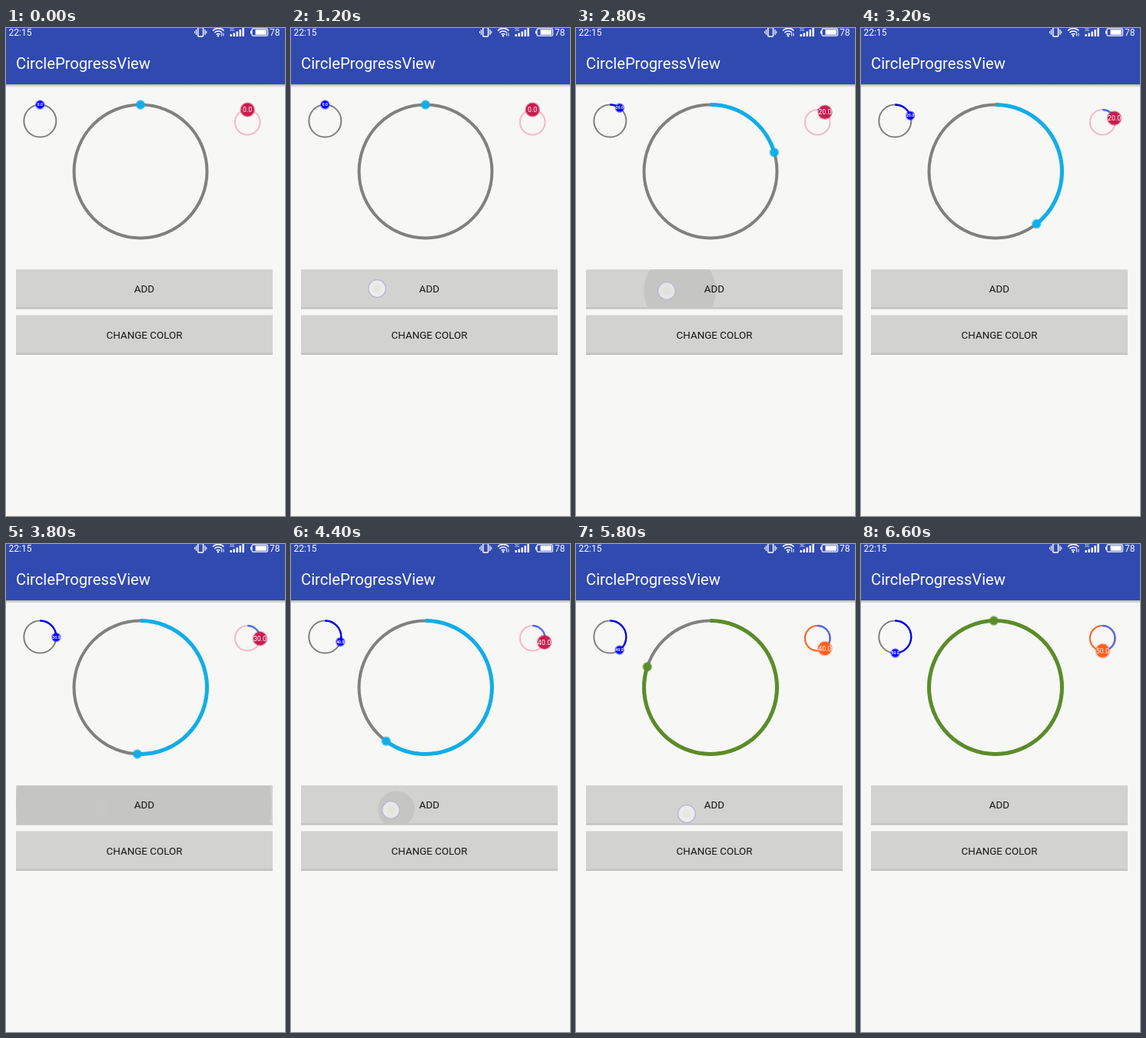
An HTML page that plays this animation: 363 px wide and 633 px high, repeating every 6.7 s.

```html
<!DOCTYPE html>
<html lang="en">
<head>
<meta charset="utf-8">
<title>CircleProgressView</title>
<style>
html, body { margin: 0; width: 100%; height: 100%; overflow: hidden; background: #f7f7f5; }
svg { display: block; font-family: Roboto, sans-serif; }
.mid { text-anchor: middle; }
.line { fill: none; stroke: #fff; }
</style>
</head>
<body>
<svg width="363" height="633" viewBox="0 0 363 633">
  <defs>
    <linearGradient id="shade" x2="0" y2="1">
      <stop offset="0" stop-color="#000" stop-opacity=".28"/>
      <stop offset="1" stop-color="#000" stop-opacity="0"/>
    </linearGradient>
  </defs>
  <rect width="363" height="633" fill="#f7f7f5"/>
  <rect y="73" width="363" height="4" fill="url(#shade)"/>
  <rect width="363" height="73" fill="#304aaf"/>

  <g fill="#fff">
    <text x="3.5" y="9.5" font-size="12">22:15</text>
    <text x="343" y="9.5" font-size="12">78</text>
    <text x="13" y="53" font-size="20.2">CircleProgressView</text>
    <g class="line" stroke-width="1.5">
      <rect x="249.8" y="-.5" width="6.8" height="11.5" rx="1"/>
      <path d="M247.5 2v7M259 2v7" stroke-width="1.2"/>
      <path d="M245.6 4v3M260.8 4v3" stroke-width="1"/>
      <path d="M269 3.5a10 10 0 0 1 14.5 0M271.3 6a7 7 0 0 1 9.8 0M273.6 8.4a4 4 0 0 1 5 0"/>
      <path d="M280.6 6.5v4M283 6.5v4" stroke-width="1"/>
      <rect x="320" y=".8" width="20.5" height="9.4" rx="1.5" stroke-width="1.2"/>
    </g>
    <circle cx="276" cy="10.2" r="1.2"/>
    <text x="291" y="4" font-size="5">3G</text>
    <path d="M291.5 8h2.4v3h-2.4zM295.5 6.5h2.4v4.500h-2.400zM299.500 4.500h2.400v6.500h-2.400zM303.500 2h2.400v9h-2.400zM307.400 0h2.400v11h-2.400z"/>
    <path d="M318 3.500h1.500v4h-1.500zM324.500 2.300h14.500v6.400h-14.500z"/>
  </g>

  <g id="rings"></g>
  <g id="buttons"></g>
  <g id="finger">
    <circle r="11.3" fill="#ececec" stroke="#b4b4d6" stroke-width="1.3"/>
    <circle r="5.5" fill="#e6e8de"/>
  </g>
</svg>
<script>
const LOOP = 6700, STEP = 100, GROW = 500;
const $ = id => document.getElementById(id);

// down: finger appears, up: click fires, btn: 0 = add, 1 = change color
const taps = [
  { down: 1200, up: 1770, x: 112, y: 338, btn: 0 },
  { down: 2400, up: 2755, x: 118, y: 341, btn: 0 },
  { down: 3400, up: 3538, x: 124, y: 343, btn: 0 },
  { down: 4200, up: 4378, x: 130, y: 345, btn: 0 },
  { down: 5000, up: 5170, x: 142, y: 404, btn: 1 },
  { down: 5800, up: 6145, x: 144, y: 350, btn: 0 }
];

function add(parent, tag, attrs, text) {
  const el = document.createElementNS('http://www.w3.org/2000/svg', tag);
  set(el, attrs);
  if (text) el.textContent = text;
  return parent.appendChild(el);
}
function set(el, attrs) {
  for (const k in attrs) el.setAttribute(k, attrs[k]);
}
const clamp = x => Math.min(1, Math.max(0, x));
const ease = x => (1 - Math.cos(Math.PI * x)) / 2;

function makeRing(o) {
  const g = add($('rings'), 'g', {});
  const base = { cx: o.cx, cy: o.cy, r: o.r, fill: 'none' };
  const track = add(g, 'circle', { ...base, 'stroke-width': o.w });
  const arc = add(g, 'circle', {
    ...base, 'stroke-width': o.arcW, pathLength: 360,
    transform: `rotate(-90 ${o.cx} ${o.cy})`
  });
  const knob = add(g, 'g', {});
  const halo = add(knob, 'circle', { r: o.knob + 1.3, 'fill-opacity': .45 });
  const dot = add(knob, 'circle', { r: o.knob });
  const label = o.font && add(knob, 'text', {
    class: 'mid', y: o.font * .36, fill: '#fff', 'font-size': o.font, 'font-weight': o.weight
  });
  return (deg, value, alt) => {
    const [trackC, arcC, dotC] = alt ? o.alt : o.colors;
    const a = deg * Math.PI / 180;
    set(track, { stroke: trackC });
    set(arc, { stroke: arcC, 'stroke-dasharray': `${deg} 400` });
    set(halo, { fill: dotC });
    set(dot, { fill: dotC });
    set(knob, { transform: `translate(${o.cx + o.r * Math.sin(a)} ${o.cy - o.r * Math.cos(a)})` });
    if (label) label.textContent = value.toFixed(1);
  };
}

const blue = ['#808080', '#0000ee', '#0000ff'];
const small = makeRing({ cx: 44.3, cy: 120.5, r: 21, w: 2, arcW: 2.3, knob: 5,
  font: 5, weight: 700, colors: blue, alt: blue });
const large = makeRing({ cx: 175, cy: 186, r: 86.5, w: 4, arcW: 5, knob: 5.2,
  colors: ['#808080', '#10aee8', '#10aee8'], alt: ['#808080', '#5b8c2a', '#5b8c2a'] });
const pink = makeRing({ cx: 314.2, cy: 122.3, r: 16.3, w: 2, arcW: 2.3, knob: 8.5,
  font: 8.8, weight: 400, colors: ['#f6bac8', '#4a6cf2', '#c91c50'], alt: ['#ff6022', '#4a6cf2', '#ff5f1f'] });

function makeButton(y, text, i) {
  const g = $('buttons');
  const box = { x: 13, y, width: 334, height: 50.5 };
  const clip = add(g, 'clipPath', { id: 'clip' + i });
  add(clip, 'rect', box);
  add(g, 'rect', { ...box, y: y + 1, fill: '#c3c3c1' });
  add(g, 'rect', { ...box, height: 49, fill: '#d2d2d0' });
  const ripple = add(g, 'circle', { fill: '#c5c5c3', 'clip-path': `url(#clip${i})` });
  add(g, 'text', { class: 'mid', x: 180, y: y + 30, 'font-size': 13.4, fill: '#161616' }, text);
  return { ripple, mid: y + 25 };
}
const buttons = [makeButton(313.2, 'ADD', 0), makeButton(372.5, 'CHANGE COLOR', 1)];

function draw(t) {
  let amount = 0, count = 0, alt = false;
  buttons.forEach(b => set(b.ripple, { opacity: 0 }));
  set($('finger'), { opacity: 0 });

  for (const tap of taps) {
    if (t < tap.down) break;
    const e = t - tap.up;
    set($('finger'), {
      transform: `translate(${tap.x} ${tap.y})`,
      opacity: clamp(1 - Math.max(0, e) / 270)
    });
    if (e < 0) break;
    if (tap.btn) alt = true;
    else {
      count++;
      amount += ease(clamp(e / GROW));
    }
    // ripple spreads while its center drifts to the middle of the button
    const b = buttons[tap.btn];
    const p = 1 - (1 - clamp(e / 300)) ** 2;
    set(b.ripple, {
      cx: tap.x + (180 - tap.x) * p,
      cy: tap.y + (b.mid - tap.y) * p,
      r: 169 * p,
      opacity: clamp((420 - e) / 150)
    });
  }
  small(amount * 36, count * 10, alt);
  large(amount * 72, count * 10, alt);
  pink(amount * 36, count * 10, alt);
}

const start = performance.now();
function tick() {
  const t = (performance.now() - start) % LOOP;
  draw(Math.floor(t / STEP) * STEP);
  requestAnimationFrame(tick);
}
tick();
</script>
</body>
</html>
```
